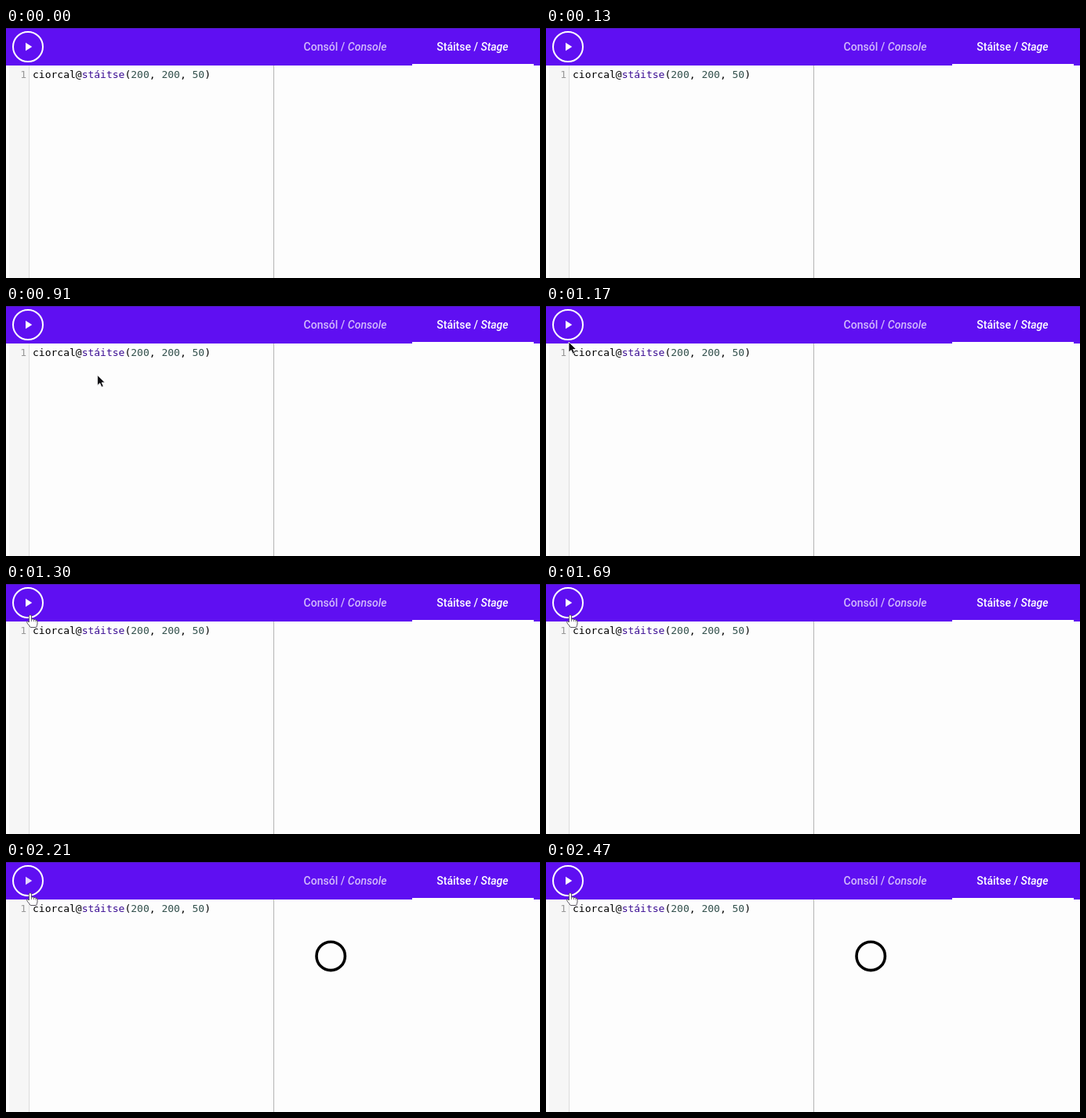
These frames come from a looping animation (681x320 px, 3.12 s). An HTML page:

```html
<!DOCTYPE html>
<html lang="ga">
<head>
<meta charset="utf-8">
<title>Ciorcal</title>
<style>
  html, body { margin: 0; width: 100%; height: 100%; overflow: hidden; background: #fdfdfd; }
  svg { display: block; width: 681px; height: 320px; }
  text { white-space: pre; }
  .tab { font: 500 14px Roboto, sans-serif; fill: #fff; }
  .tab .en { font-style: italic; }
  .idle { fill: #d2bbfb; }
  .code { font: 13px "DejaVu Sans Mono", monospace; fill: #000; }
  .code .obj { fill: #3b0d94; }
  .code .num { fill: #33514d; }
  .code.line { fill: #999; }
</style>
</head>
<body>
<svg viewBox="0 0 681 320">
  <rect width="681" height="320" fill="#fdfdfd"/>
  <rect x="4" y="48" width="25" height="272" fill="#f6f6f6"/>
  <rect x="29" y="48" width="1" height="272" fill="#dcdcdc"/>
  <rect x="341" y="48" width="1" height="272" fill="#b4b4b4"/>

  <rect width="681" height="48" fill="#5f0ff2"/>
  <rect width="681" height="1" fill="#4c1cb4"/>
  <rect x="518" y="46" width="155" height="2" fill="#fff"/>
  <circle cx="28" cy="24" r="19" fill="none" stroke="#fff" stroke-width="2"/>
  <path id="play" d="M25 18.75v10.5l8.25-5.25z" fill="#fff"/>

  <text class="tab idle" x="379.6" y="29">Consól / <tspan class="en">Console</tspan></text>
  <text class="tab" x="549.3" y="29">Stáitse / <tspan class="en">Stage</tspan></text>

  <text class="code line" x="18.2" y="64">1</text>
  <text class="code" x="34" y="64">ciorcal@<tspan class="obj">stáitse</tspan>(<tspan class="num">200</tspan>, <tspan class="num">200</tspan>, <tspan class="num">50</tspan>)</text>

  <circle id="ring" cx="414.2" cy="120.4" r="18.2" fill="none" stroke="#000" stroke-width="3.6"/>

  <path id="arrow" d="M0 0V13.2L3.1 10.4L5.2 15.2L7.6 14.2L5.5 9.5H9.6Z"
        fill="#0c0c10" stroke="#fff" stroke-width=".8" stroke-linejoin="round"/>
  <g id="hand" stroke="#44404c" stroke-linejoin="round">
    <path d="M29.3 49V41.2Q29.3 39.6 30.9 39.6T32.5 41.2V45.2Q34.6 44 35.3 45.7Q37.2 44.7 37.9 46.4Q40 45.9 40 48V51Q39.6 53.2 38.7 55.5H31.2Q29.6 53 27.2 50.2Q25.8 48.2 27.4 47.7Q28.4 47.7 29.3 49Z"
          fill="#fff" stroke-width=".9"/>
    <path d="M32.5 45.2V48M35.3 45.7V48.2M37.9 46.4V48.6" fill="none" stroke-width=".7"/>
  </g>
</svg>
<script>
const LOOP = 3120, STEP = 130;
const MOVE = 780, HOVER = 1300, PRESS = 2080, DRAW = 2210, RELEASE = 2340;
const from = [190, 124], to = [29, 46];
const el = id => document.getElementById(id);
const [play, ring, arrow, hand] = ["play", "ring", "arrow", "hand"].map(el);
const show = (node, on) => node.setAttribute("visibility", on ? "visible" : "hidden");
const easeOut = p => 1 - (1 - p) ** 1.5;

function render(time) {
  const t = Math.floor((time % LOOP) / STEP) * STEP;
  const p = easeOut(Math.min(1, Math.max(0, (t - MOVE) / (HOVER - STEP - MOVE))));
  const [x, y] = from.map((a, i) => a + (to[i] - a) * p);
  arrow.setAttribute("transform", `translate(${x} ${y})`);
  show(arrow, t >= MOVE && t < HOVER);
  show(hand, t >= HOVER);
  show(ring, t >= DRAW);
  play.setAttribute("fill", t >= PRESS && t < RELEASE ? "#e4d6fd" : "#fff");
}

const start = performance.now();
function tick() {
  render(performance.now() - start);
  requestAnimationFrame(tick);
}
tick();
</script>
</body>
</html>
```
